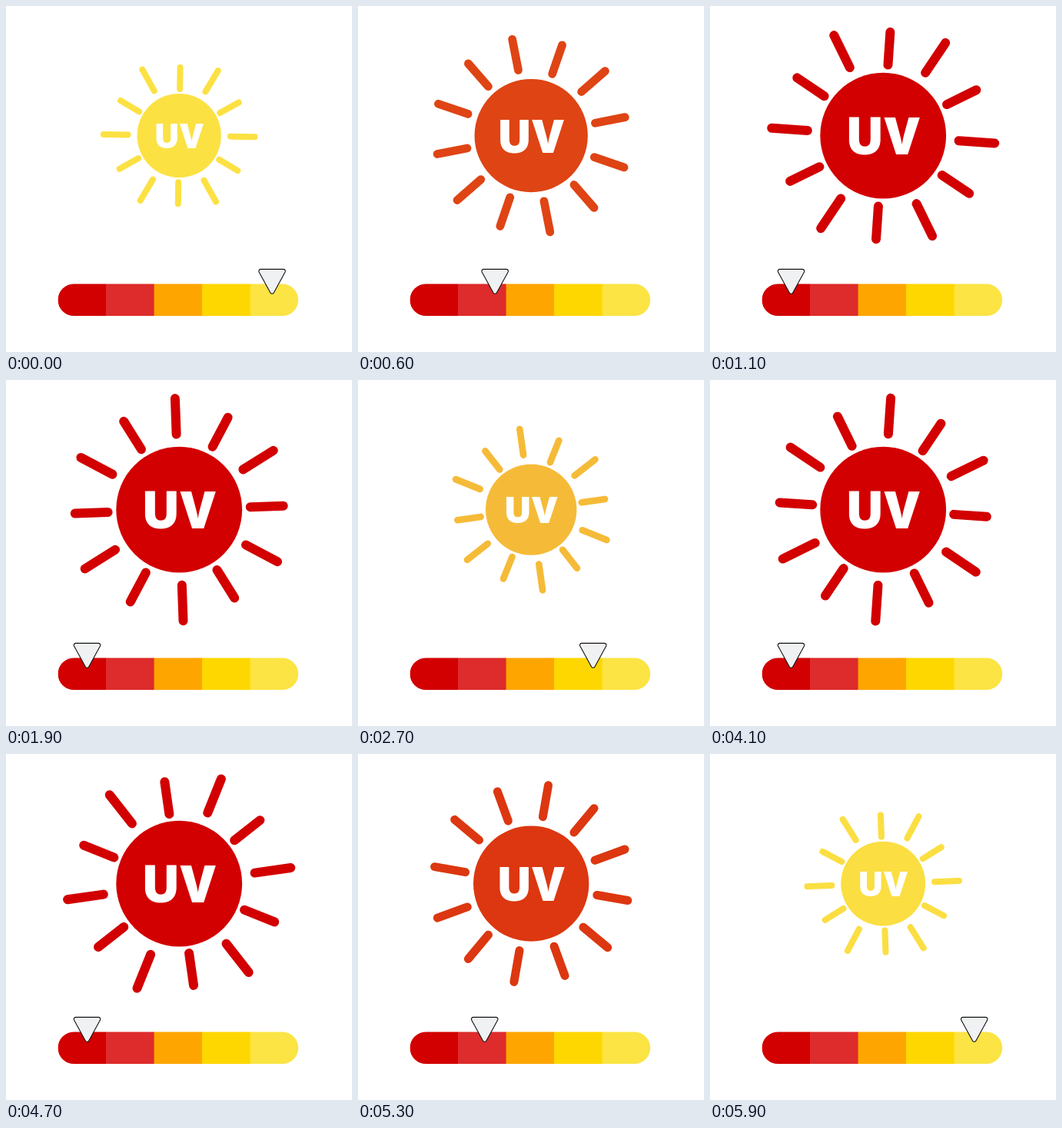
Write an HTML page with a canvas that moves like this. It is 450x450 px and loops after 6 s.

```html
<!DOCTYPE html>
<html lang="en">
<head>
<meta charset="utf-8">
<title>UV index</title>
<style>
  html, body { margin: 0; width: 100%; height: 100%; overflow: hidden; background: #fff; }
  canvas { display: block; width: 450px; height: 450px; }
</style>
</head>
<body>
<canvas id="stage" width="450" height="450"></canvas>
<script>
const ctx = document.getElementById('stage').getContext('2d');
const LOOP = 6000, STEP = 100, PHASE = 30;
const MILD = [252, 225, 67], SEVERE = [210, 0, 0];
const BAR = { x: 67.5, y: 361.3, w: 312.7, h: 41.8 };
const BAR_COLORS = ['#d20000', '#de2b2b', '#ffa500', '#ffd700', '#fbe444'];

const mix = (a, b, k) => a + (b - a) * k;
const easeSine = p => (1 - Math.cos(Math.PI * p)) / 2;

// Rise for one second, hold for one, fall for one.
function intensity(sec) {
  const s = sec % 3;
  return s < 1 ? easeSine(s) : s < 2 ? 1 : easeSine(3 - s);
}

function drawSun(sec, level) {
  const color = `rgb(${MILD.map((c, i) => Math.round(mix(c, SEVERE[i], level)))})`;
  ctx.save();
  ctx.translate(225.2, 168.6);
  ctx.scale(mix(1, 1.5, level), mix(1, 1.5, level));
  ctx.fillStyle = ctx.strokeStyle = color;
  ctx.beginPath();
  ctx.arc(0, 0, 54.6, 0, 2 * Math.PI);
  ctx.fill();

  // Neighbouring rays pulse in opposite directions.
  const pulse = 0.05 * Math.cos(2 * Math.PI * sec / 3);
  ctx.lineWidth = 8;
  ctx.lineCap = 'round';
  for (let i = 0; i < 12; i++) {
    const reach = 1 + (i % 2 ? -pulse : pulse);
    ctx.save();
    ctx.rotate((i + sec) * Math.PI / 6);
    ctx.beginPath();
    ctx.moveTo(59.6 * reach + 4, 0);
    ctx.lineTo(97.4 * reach - 4, 0);
    ctx.stroke();
    ctx.restore();
  }

  ctx.fillStyle = '#fff';
  ctx.font = '800 44.5px "Open Sans", sans-serif';
  ctx.textAlign = 'center';
  ctx.fillText('UV', -0.6, 16.5);
  ctx.restore();
}

function drawBar() {
  const part = BAR.w / BAR_COLORS.length;
  ctx.save();
  ctx.beginPath();
  ctx.roundRect(BAR.x, BAR.y, BAR.w, BAR.h, BAR.h / 2);
  ctx.clip();
  BAR_COLORS.forEach((color, i) => {
    ctx.fillStyle = color;
    ctx.fillRect(BAR.x + i * part, BAR.y, part + 0.5, BAR.h);
  });
  ctx.restore();
}

function drawPointer(x) {
  ctx.beginPath();
  ctx.moveTo(x, 342.4);
  ctx.arcTo(x + 19, 342.4, x, 377, 2.5);
  ctx.arcTo(x, 377, x - 19, 342.4, 2.5);
  ctx.arcTo(x - 19, 342.4, x, 342.4, 2.5);
  ctx.closePath();
  ctx.fillStyle = '#eff1f2';
  ctx.fill();
  ctx.strokeStyle = '#111';
  ctx.lineWidth = 1.1;
  ctx.stroke();
}

function frame(now) {
  const sec = (Math.floor(now % LOOP / STEP) * STEP + PHASE) / 1000;
  const level = intensity(sec);
  ctx.fillStyle = '#fff';
  ctx.fillRect(0, 0, 450, 450);
  drawSun(sec, level);
  drawBar();
  drawPointer(mix(346.6, 105.5, level));
  requestAnimationFrame(frame);
}
requestAnimationFrame(frame);
</script>
</body>
</html>
```
